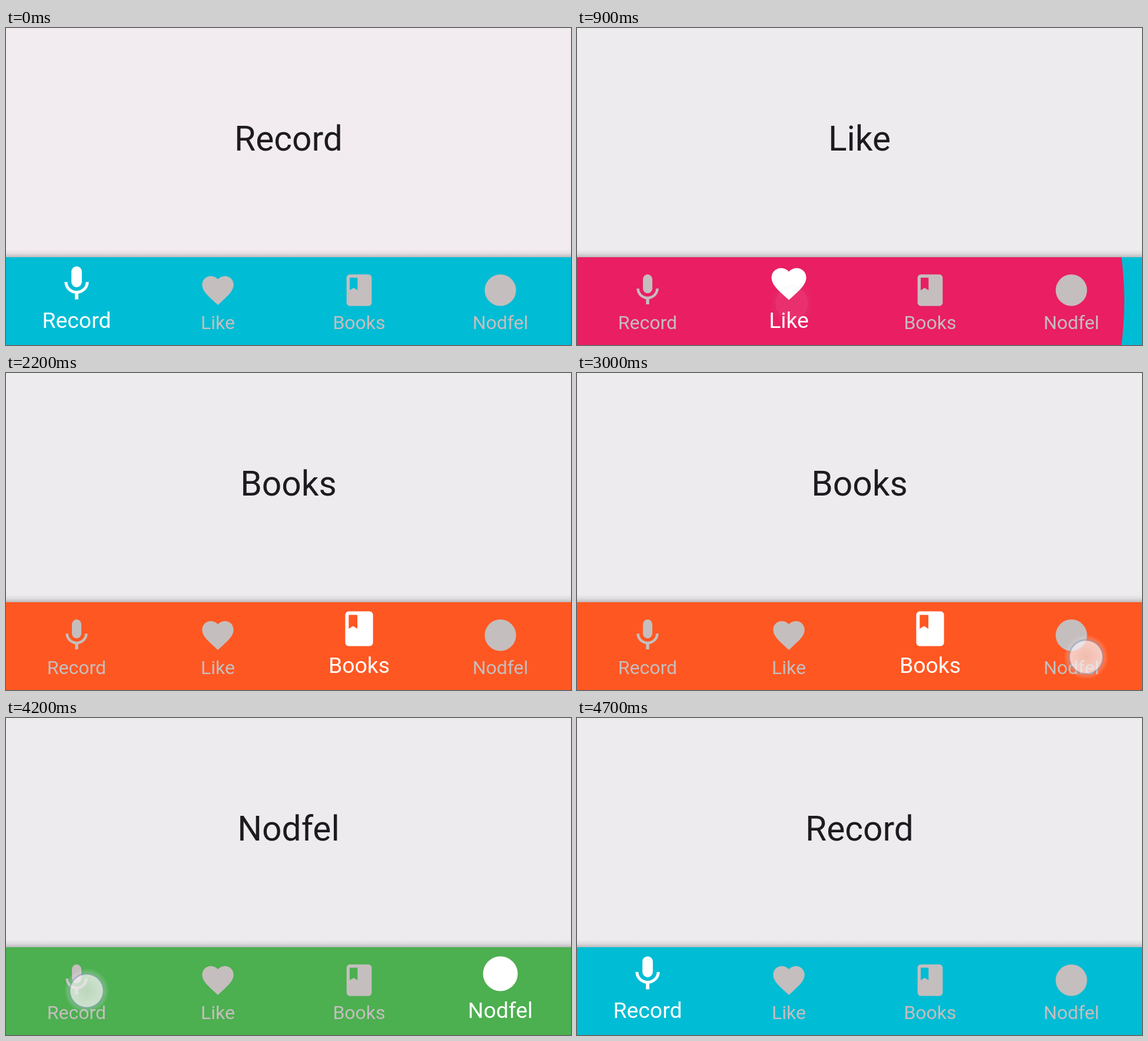
Animation of 960 by 538 pixels, one loop 4800 ms. Source, as an HTML page with a canvas:

```html
<!DOCTYPE html>
<html lang="en">
<head>
<meta charset="utf-8">
<title>Bottom navigation</title>
<style>
  html, body { margin: 0; width: 100%; height: 100%; overflow: hidden; }
  canvas { display: block; }
</style>
</head>
<body>
<canvas id="stage" width="960" height="538"></canvas>
<script>
const ctx = document.getElementById('stage').getContext('2d');
const W = 960, H = 538, BAR_TOP = 389, LOOP = 4800, STEP = 100;
const DP = W / 360;
const IDLE = [197, 190, 190], ACTIVE = [255, 255, 255];

const items = [
  { label: 'Record', color: '#00bcd4', icon: 'M12 14a3 3 0 0 0 3-3V5a3 3 0 0 0-6 0v6a3 3 0 0 0 3 3z M17.3 11c0 3-2.54 5.1-5.3 5.1S6.7 14 6.7 11H5c0 3.41 2.72 6.23 6 6.72V21h2v-3.28c3.28-.48 6-3.3 6-6.72z' },
  { label: 'Like', color: '#e91e63', icon: 'M12 21.35l-1.45-1.32C5.4 15.36 2 12.28 2 8.5 2 5.42 4.42 3 7.5 3c1.74 0 3.41.81 4.5 2.09C13.09 3.81 14.76 3 16.5 3 19.58 3 22 5.42 22 8.5c0 3.78-3.4 6.86-8.55 11.54z' },
  { label: 'Books', color: '#ff5722', icon: 'M18 2H6a2 2 0 0 0-2 2v16a2 2 0 0 0 2 2h12a2 2 0 0 0 2-2V4a2 2 0 0 0-2-2z M6 4h5v8l-2.5-1.5L6 12z' },
  { label: 'Nodfel', color: '#4caf50', icon: 'M2 12a10 10 0 0 1 20 0a10 10 0 0 1-20 0z' }
].map((item, i) => ({ ...item, x: 120 + 240 * i, path: new Path2D(item.icon) }));

// Finger down at `press`, selection begins at `start`.
const taps = [
  { to: 1, press: 700, start: 717, x: 365, y: 467 },
  { to: 2, press: 2000, start: 1990, x: 621, y: 473 },
  { to: 3, press: 3000, start: 3035, x: 865, y: 482 },
  { to: 0, press: 4200, start: 4255, x: 137, y: 463 }
];

const clamp = v => Math.min(1, Math.max(0, v));
const lerp = (a, b, p) => a + (b - a) * p;
const easeInOut = p => (1 - Math.cos(Math.PI * p)) / 2;
const easeOut = p => 1 - (1 - p) ** 2;

function drawText(text, x, y, size, color) {
  ctx.font = `400 ${size}px Roboto, sans-serif`;
  ctx.textAlign = 'center';
  ctx.fillStyle = color;
  ctx.fillText(text, x, y);
}

function drawItem(item, p) {
  const color = `rgb(${IDLE.map((c, i) => Math.round(lerp(c, ACTIVE[i], p)))})`;
  const scale = lerp(64, 70.8, p) / 24;
  ctx.save();
  ctx.translate(item.x, lerp(445, 434, p));
  ctx.scale(scale, scale);
  ctx.translate(-12, -12);
  ctx.fillStyle = color;
  ctx.fill(item.path, 'evenodd');
  ctx.restore();
  drawText(item.label, item.x, lerp(511, 509, p), lerp(12, 14, p) * DP, color);
}

function drawShadow() {
  const g = ctx.createLinearGradient(0, 376, 0, BAR_TOP);
  g.addColorStop(0, 'rgba(0,0,0,0)');
  g.addColorStop(0.5, 'rgba(0,0,0,.06)');
  g.addColorStop(1, 'rgba(0,0,0,.21)');
  ctx.fillStyle = g;
  ctx.fillRect(0, 376, W, BAR_TOP - 376);
}

function drawBar(from, to, progress) {
  ctx.save();
  ctx.beginPath();
  ctx.rect(0, BAR_TOP, W, H - BAR_TOP);
  ctx.clip();
  ctx.fillStyle = from.color;
  ctx.fillRect(0, BAR_TOP, W, H - BAR_TOP);
  ctx.fillStyle = to.color;
  ctx.beginPath();
  ctx.arc(to.x, (BAR_TOP + H) / 2, W * easeInOut(progress), 0, 2 * Math.PI);
  ctx.fill();
  ctx.restore();
}

function drawTouch({ x, y }, alpha) {
  const r = 38, g = ctx.createRadialGradient(x, y, 0, x, y, r);
  g.addColorStop(0, 'rgba(235,230,232,.7)');
  g.addColorStop(0.7, 'rgba(245,242,245,.76)');
  g.addColorStop(0.77, 'rgba(130,150,185,.6)');
  g.addColorStop(0.82, 'rgba(225,225,235,.22)');
  g.addColorStop(1, 'rgba(255,255,255,0)');
  ctx.globalAlpha = alpha;
  ctx.fillStyle = g;
  ctx.fillRect(x - r, y - r, 2 * r, 2 * r);
  ctx.globalAlpha = 1;
}

function render(t) {
  const index = taps.findLastIndex(tap => t >= tap.start);
  const from = index > 0 ? taps[index - 1].to : 0;
  const to = index < 0 ? 0 : taps[index].to;
  const elapsed = index < 0 ? LOOP : t - taps[index].start - 15;
  const selected = easeOut(clamp(elapsed / 150));

  ctx.fillStyle = t < 700 ? '#f2ecf0' : '#eeebee';
  ctx.fillRect(0, 0, W, H);
  drawText(items[to].label, 480, 208, 22 * DP, '#1d1b20');
  drawShadow();
  drawBar(items[from], items[to], clamp(elapsed / 300));
  items.forEach((item, i) =>
    drawItem(item, i === to ? selected : i === from ? 1 - selected : 0));

  for (const tap of taps) {
    const alpha = 1 - clamp((t - tap.start - 50) / 150);
    if (t >= tap.press && alpha > 0) drawTouch(tap, alpha);
  }
}

const origin = performance.now();
function tick() {
  const t = (performance.now() - origin) % LOOP;
  render(Math.floor(t / STEP) * STEP);
  requestAnimationFrame(tick);
}
tick();
</script>
</body>
</html>
```
